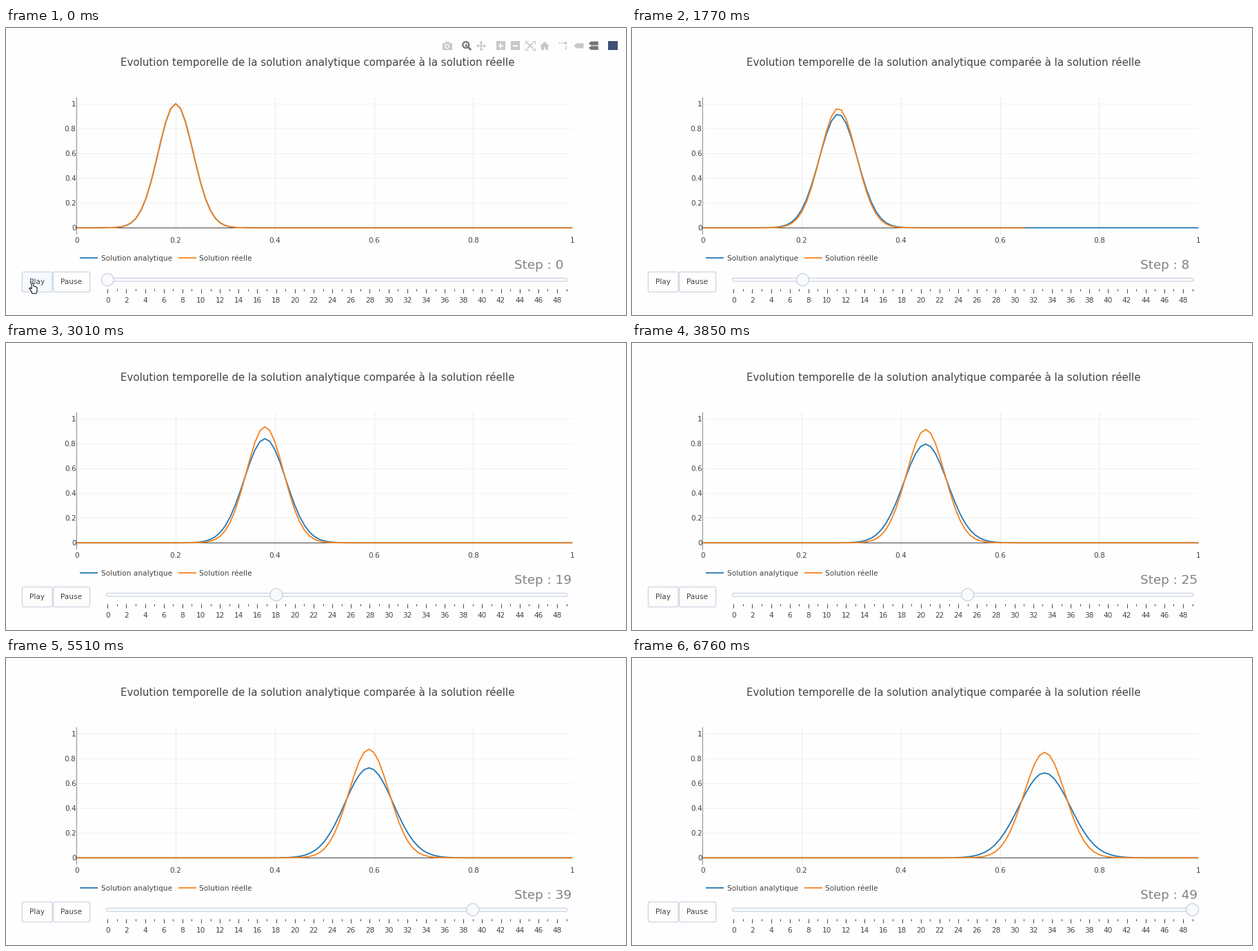
A matplotlib script for the animation above (7.96 s loop, 899 by 417 pixels).

```python
import math

import matplotlib.pyplot as plt
import numpy as np
from matplotlib.animation import FuncAnimation
from matplotlib.patches import Circle, FancyBboxPatch, Polygon, Rectangle

WIDTH, HEIGHT, DPI = 899, 417, 64
PT = 72 / DPI                     # points per pixel
LOOP, INTERVAL = 7960, 40
PAPER, INK = "#fefefe", "#444444"
BLUE, ORANGE = "#2679b3", "#f78320"
BORDER, PALE, HOVER = "#bec8d9", "#f8fafc", "#f4faff"
LIGHT, DARK = "#c8c8c8", "#7b7676"

LEFT, RIGHT, ZERO_Y, UNIT_Y = 102.3, 821, 290.3, 180.2
GRIP_X, GRIP_STEP = 147.2, 13.58
LAST_STEP = 49

plt.rcParams["font.family"] = "DejaVu Sans"
fig = plt.figure(figsize=(WIDTH / DPI, HEIGHT / DPI), dpi=DPI, facecolor=PAPER)
ax = fig.add_axes([0, 0, 1, 1])
ax.set(xlim=(0, WIDTH), ylim=(HEIGHT, 0))
ax.axis("off")


def px(x):
    return LEFT + (RIGHT - LEFT) * x


def py(y):
    return ZERO_Y - UNIT_Y * y


def text(x, middle, label, size=10.5, ha="center", color=INK):
    return ax.text(x, middle + 0.365 * size, label, fontsize=size * PT, ha=ha,
                   va="baseline", color=color, zorder=4)


def line(xs, ys, color, width=1.0, zorder=2, cap="butt"):
    return ax.plot(xs, ys, color=color, lw=width * PT, zorder=zorder,
                   solid_capstyle=cap, solid_joinstyle="round")[0]


def rounded(x0, y0, x1, y1, radius, fill):
    box = FancyBboxPatch((x0, y0), x1 - x0, y1 - y0, fc=fill, ec=BORDER,
                         boxstyle=f"round,pad=0,rounding_size={radius}",
                         lw=0.9 * PT, zorder=3)
    return ax.add_patch(box)


# Chart
def draw_chart():
    text(452, 50, "Evolution temporelle de la solution analytique "
                  "comparée à la solution réelle", 15)
    for i in range(6):
        value = i / 5
        label = f"{value:g}"
        text(px(value), 308, label)
        text(101.5, py(value), label, ha="right")
        if 0 < i < 5:
            line([px(value)] * 2, [99.5, 300], "#ebebeb", zorder=1)
        if i:
            line([LEFT, RIGHT], [py(value)] * 2, "#f1f1f1", zorder=1)
    line([LEFT] * 2, [99.5, 300], "#8c8c8c")
    line([LEFT, RIGHT], [ZERO_Y] * 2, INK)
    for x, color, label in ((107, BLUE, "Solution analytique"),
                            (249.5, ORANGE, "Solution réelle")):
        line([x, x + 26], [333.5] * 2, color, 1.8)
        text(x + 30.5, 334, label, ha="left")


# Slider and buttons
def draw_controls():
    rounded(145.2, 363.4, 814, 368.2, 2.2, PALE)
    ticks = GRIP_X + GRIP_STEP * np.arange(LAST_STEP + 1)
    ax.vlines(ticks[::2], 378.7, 385, color="#333333", lw=0.9 * PT)
    ax.vlines(ticks[1::2], 378.7, 381.6, color="#333333", lw=0.9 * PT)
    for i in range(0, LAST_STEP, 2):
        text(ticks[i], 395.5, str(i))
    rounded(68.5, 354.4, 121.7, 383.5, 2, PAPER)
    text(95, 368, "Pause")
    text(45, 368, "Play")
    return rounded(23.4, 354.4, 67, 383.5, 2, HOVER)


# Toolbar icons
def draw_toolbar():
    parts = []

    def add(patch):
        patch.set_zorder(5 + len(parts) / 100)
        parts.append(ax.add_patch(patch))

    def rect(x0, y0, x1, y1, color=LIGHT):
        add(Rectangle((x0, y0), x1 - x0, y1 - y0, fc=color, lw=0))

    def shape(points, color=LIGHT):
        add(Polygon(points, fc=color, lw=0))

    def disc(x, y, radius, color):
        add(Circle((x, y), radius, fc=color, lw=0))

    def stroke(xs, ys, color=LIGHT, width=1.6):
        parts.append(line(xs, ys, color, width, 6))

    def tag(x, y, half, color):
        shape([(x, y), (x + 3.5, y - half), (x + 14, y - half),
               (x + 14, y + half), (x + 3.5, y + half)], color)

    rect(632.5, 22, 647, 31.5)
    rect(636.5, 20, 643, 22.5)
    disc(639.8, 26.6, 3.5, PAPER)
    disc(639.8, 26.6, 2.1, LIGHT)

    disc(666.8, 24.5, 5.6, DARK)
    disc(666.8, 24.5, 3.3, PAPER)
    stroke([664.5, 669], [24.5, 24.5], DARK, 1.4)
    stroke([666.8, 666.8], [22.3, 26.7], DARK, 1.4)
    stroke([670.3, 674.3], [28, 32], DARK, 2.8)

    stroke([684, 694], [26, 26])
    stroke([689, 689], [21, 31])
    for dx, dy in ((1, 0), (-1, 0), (0, 1), (0, -1)):
        shape([(689 + 7.2 * dx, 26 + 7.2 * dy),
               (689 + 4 * dx + 3 * dy, 26 + 4 * dy + 3 * dx),
               (689 + 4 * dx - 3 * dy, 26 + 4 * dy - 3 * dx)])

    for x in (717.3, 738.5):
        rect(x - 6.5, 19.3, x + 6.5, 32)
        stroke([x - 3.8, x + 3.8], [25.7] * 2, PAPER, 2)
    stroke([717.3] * 2, [21.9, 29.5], PAPER, 2)

    for sx in (-1, 1):
        for sy in (-1, 1):
            stroke([760 + 3 * sx, 760 + 6.6 * sx, 760 + 6.6 * sx],
                   [25.7 + 6.6 * sy, 25.7 + 6.6 * sy, 25.7 + 3 * sy], width=1.3)
            stroke([760, 760 + 4.5 * sx], [25.7, 25.7 + 4.5 * sy], width=1.8)

    shape([(774, 26.4), (781, 19.7), (788, 26.4)])
    rect(776.3, 25.8, 785.7, 31.5)
    rect(779.7, 27.8, 782.3, 31.5, PAPER)

    for x, y in ((802, 21), (805.5, 21), (810.5, 25.5), (810.5, 29)):
        rect(x, y, x + 2, y + 2)
    disc(811.3, 22, 2, LIGHT)

    tag(823.5, 25.8, 3.6, LIGHT)
    tag(844.8, 22.3, 2.8, DARK)
    tag(844.8, 29, 2.8, DARK)
    rect(873, 18.5, 887, 32.3, "#3f4f75")
    return parts


HAND = np.array([(37.2, 371), (37.2, 379.2), (35, 377.3), (33.7, 378.6),
                 (37.2, 383.2), (37.8, 385.8), (43.8, 385.8), (45, 382.5),
                 (45, 377), (43.6, 376), (41.8, 375.4), (40, 375),
                 (39.8, 371), (38.5, 370.2)])

draw_chart()
play_button = draw_controls()
toolbar = draw_toolbar()
hand = ax.add_patch(Polygon(HAND, fc="white", ec="black", lw=PT, zorder=10))
step_label = text(737, 343.5, "", 18.4, "left", "#838383")
analytic = line([], [], BLUE, 1.85, 3)
real = line([], [], ORANGE, 1.85, 3.1)
grip = ax.add_patch(Circle((GRIP_X, 365.8), 9, fc=PALE, ec=BORDER,
                           lw=PT, zorder=5))

# Motion
START, TICK = 660, 69.1           # first change and refresh period, ms
PACE_TICKS = [3.3, 16, 34, 46, 57, 70, 88]
PACE_STEPS = [0, 7.46, 18.17, 24.95, 31.34, 38.95, LAST_STEP]
X = np.linspace(0, 1, 101)


def ease(u):
    return 4 * u ** 3 if u < 0.5 else 1 - 4 * (1 - u) ** 3


def pulse(step, spread):
    """Travelling Gaussian that widens and flattens by diffusion."""
    growth = 1 + spread * step
    return np.exp(-((X - 0.2 - 0.01 * step) / 0.05) ** 2 / growth) / math.sqrt(growth)


def blend(before, after, amount, spread):
    return (1 - amount) * pulse(before, spread) + amount * pulse(after, spread)


def update(frame):
    t = frame * INTERVAL + INTERVAL / 2
    tick = math.floor((t - START) / TICK)
    now = START + tick * TICK

    progress = float(np.interp(tick, PACE_TICKS, PACE_STEPS))
    after = math.ceil(progress)
    before = max(after - 1, 0)
    amount = ease(progress - before)

    # The path shortens for a moment when it loses points between two steps.
    end = 1.0
    if after and after % 8 == 0:
        tail = 0.2 + 0.01 * before + 0.14 + 0.0025 * before
        end = tail + (1 - tail) * amount

    analytic.set_data(px(X), py(blend(before, after, amount, 0.0231)))
    real.set_data(px(np.minimum(X, end)), py(blend(before, after, amount, 0.0078)))
    step_label.set_text(f"Step : {after}")
    grip.set_center((GRIP_X + GRIP_STEP * (before + amount * (after - before)), 365.8))

    slide = float(np.clip((now - START) / 240, 0, 1))
    hand.set_xy(HAND + slide * np.array([-6, 24]))
    hand.set_visible(slide < 1)
    play_button.set_facecolor(HOVER if slide < 0.6 else PAPER)

    fade = float(np.clip((1240 - now) / 300, 0, 1))
    for part in toolbar:
        part.set_alpha(fade)
        part.set_visible(fade > 0)
    return []


animation = FuncAnimation(fig, update, frames=LOOP // INTERVAL, interval=INTERVAL,
                          repeat=True, repeat_delay=0, blit=False)
plt.show()
```
